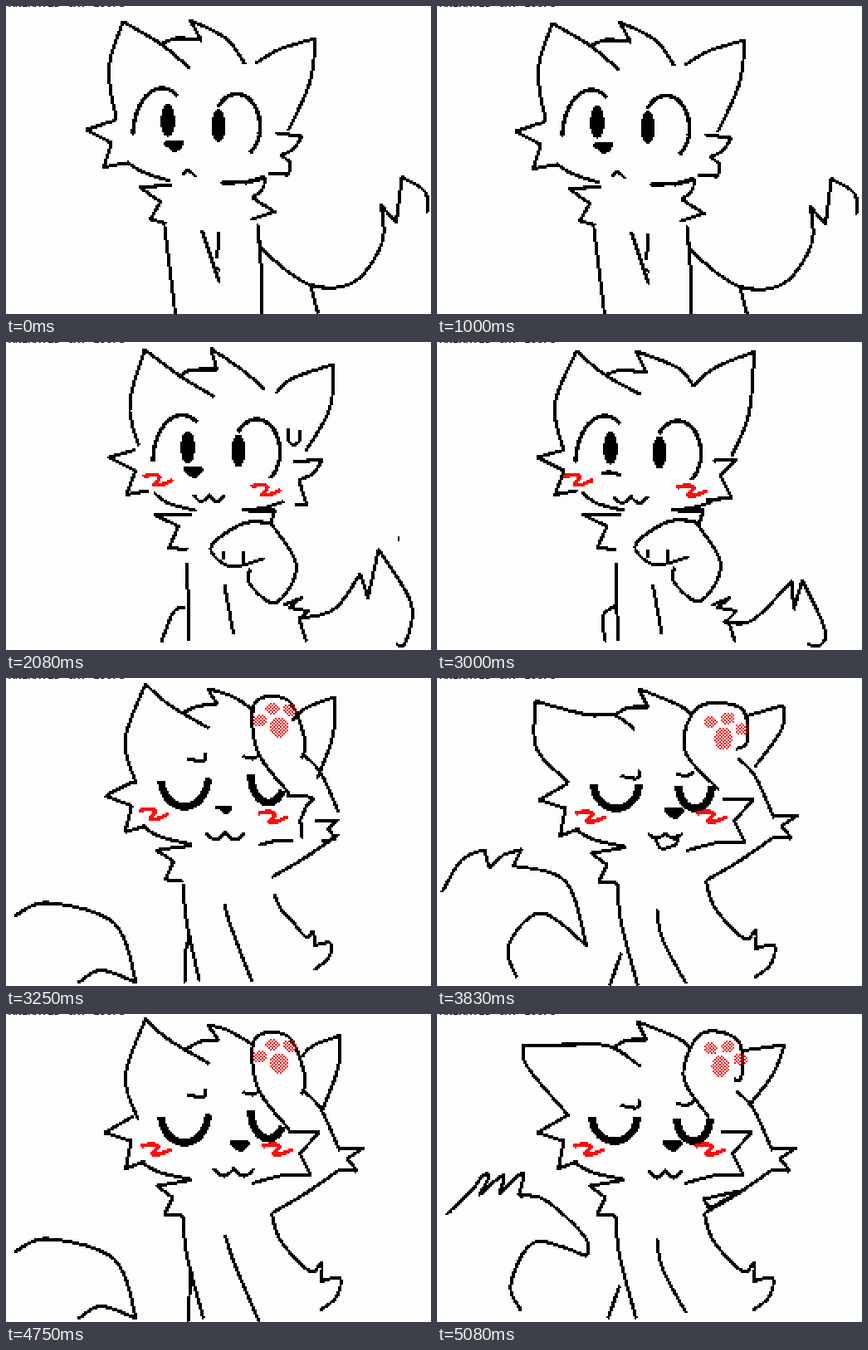
An HTML page with a canvas for the animation above (5.25 s loop, 512 by 371 pixels).

```html
<!DOCTYPE html>
<html lang="en">
<head>
<meta charset="utf-8">
<title>Cat salute</title>
<style>
html, body { margin: 0; width: 100%; height: 100%; overflow: hidden; background: #fdfdfd; }
canvas { position: absolute; left: 0; top: 0; width: 512px; height: 372px; image-rendering: pixelated; }
p { position: absolute; left: 3px; top: -10px; margin: 0; font: bold 13px/13px "DejaVu Sans Mono", monospace; white-space: nowrap; }
</style>
</head>
<body>
<canvas width="256" height="186"></canvas>
<p>ANIMATED CAT LOOPS</p>
<script>
const ellipses = /^(pupil|pad)/;
const between = (p, q, t) => p.map((v, k) => v + (q[k] - v) * t);

// Catmull-Rom curve through "x,y" points; a slash makes the point before it a sharp corner
function smooth(text) {
  const out = [];
  for (const run of text.split('/')) {
    const pts = run.split(' ').map(p => p.split(',').map(Number));
    if (out.length) pts.unshift(out[out.length - 1]);
    else out.push(pts[0]);
    for (let i = 0; i + 1 < pts.length; i++) {
      const b = pts[i], c = pts[i + 1], a = pts[i - 1] || b, d = pts[i + 2] || c;
      for (let u = .125; u <= 1; u += .125)
        out.push([0, 1].map(k => b[k] + u / 2 * (c[k] - a[k] + u * (2 * a[k] - 5 * b[k] + 4 * c[k] - d[k] + u * (3 * (b[k] - c[k]) + d[k] - a[k])))));
    }
  }
  return out;
}

// Even spacing lets any two strokes blend point by point
function resample(pts, count = 160) {
  const along = [0];
  for (let i = 1; i < pts.length; i++)
    along.push(along[i - 1] + Math.hypot(pts[i][0] - pts[i - 1][0], pts[i][1] - pts[i - 1][1]));
  let i = 1;
  return Array.from({ length: count }, (_, n) => {
    const at = along[along.length - 1] * n / (count - 1);
    while (i < pts.length - 1 && along[i] < at) i++;
    return between(pts[i - 1], pts[i], (at - along[i - 1]) / (along[i] - along[i - 1] || 1));
  });
}

function pose(parts) {
  const out = {};
  for (const name in parts) {
    const part = parts[name];
    out[name] = ellipses.test(name) ? part : resample(typeof part === 'string' ? smooth(part) : part);
  }
  return out;
}

// The matching parts of a pose, shifted; the second pair of an ellipse is its radii
function move(parts, dx, dy, which = /./) {
  const out = {};
  for (const name in parts)
    if (which.test(name))
      out[name] = parts[name].map(([x, y], i) => ellipses.test(name) && i ? [x, y] : [x + dx, y + dy]);
  return out;
}

function mix(a, b, t) {
  const out = {};
  for (const name in { ...a, ...b }) {
    if (a[name] && b[name]) out[name] = a[name].map((p, i) => between(p, b[name][i], t));
    else if ((t < .5 ? a : b)[name]) out[name] = (t < .5 ? a : b)[name];
  }
  return out;
}

function arc(x, y, rx, ry, from, to) {
  return Array.from({ length: 40 }, (_, i) => {
    const angle = (from + (to - from) * i / 39) * Math.PI / 180;
    return [x + rx * Math.cos(angle), y + ry * Math.sin(angle)];
  });
}

const at = (x, y, shape) => smooth(shape).map(p => [x + p[0], y + p[1]]);
const nose = (x, y) => at(x, y, '-11,-4/11,-4/6,3 0,5/-11,-4');
const blush = (x, y) => at(x, y, '-18,-4 -5,-6 2,-3 -5,6/4,6 18,0');
const mouth = (x, y, w, h) => Array.from({ length: 41 }, (_, i) => [x + w * i / 40, y + h * Math.abs(Math.sin(Math.PI * i / 20))]);

const openEyes = (lx, ly, rx, ry) => ({
  lidL: arc(lx, ly, 35, 58, 182, 302),
  lidR: arc(rx, ry, 28, 39, 217, 415),
  pupilL: [[lx + 7, ly - 19], [8.5, 20]],
  pupilR: [[rx - 22, ry - 1], [8.5, 20]]
});

function pads(x, y, turn) {
  const out = { pad: [[x, y], [11, 13]] };
  for (let i = 0; i < 3; i++) {
    const [toe] = arc(x, y, 25, 25, turn + 50 * i, 0);
    out['pad' + i] = [toe, [8, 7]];
  }
  return out;
}

const calm = pose({
  earL: '221,75 187,46 141,19/124,75 133,137',
  hair: '187,46 205,39 235,41/222,17/265,39 288,70',
  earR: '301,69 330,52 373,39/366,92 340,150',
  cheekL: '133,137 97,149/127,165/118,194/146,189',
  jawL: '146,188 165,200 198,211',
  cheekR: '325,153 357,157/346,172 331,180/342,189 340,203/316,202',
  jawR: '259,213 287,212 312,205',
  ruffL: '199,216 161,218/186,236/174,257/193,262',
  ruffR: '287,214 312,207/309,220 297,231/324,248/295,257',
  sideL: '191,265 204,371',
  belly: '236,270 257,333',
  crease: '257,272 254,304',
  fleck: '253,315 258,318',
  sideR: '303,263 308,325 308,371',
  tail: '303,278 314,298 367,336 420,332 453,285 452,240/470,261/477,206/505,224 507,249',
  hip: '367,336 376,371',
  ...openEyes(188, 157, 278, 145),
  nose: nose(202, 169),
  mouth: '212,204 219,198 229,206'
});

const shy = pose({
  earL: '251,66 210,41 167,9/149,75 160,125',
  hair: '208,42 222,34 254,33/247,8/285,34 312,57',
  earR: '325,62 345,44 394,27/390,80 361,131',
  cheekL: '156,130 124,139/156,155/145,184/172,179',
  jawL: '178,181 195,194 229,203',
  cheekR: '346,144 381,142/370,158 353,166/362,196/348,196',
  jawR: '285,202 310,200 335,192',
  ruffL: '224,208 179,208/208,222/196,248/219,250',
  ruffR: '292,203 324,203/318,221',
  sideL: '218,266 221,360',
  belly: '263,292 274,352',
  sideR: '334,317 356,308/341,320/364,324/352,336',
  tail: '352,333 395,322 427,279/436,308/449,250/488,315 481,362 470,364',
  hip: '354,336 362,361',
  arm: '319,218 350,270 325,314 294,292 294,273',
  paw: '319,218 285,219 247,247 270,270 311,261',
  toe1: '262,252 263,262',
  toe2: '285,252 287,268',
  leg: '216,320 202,325 187,362',
  sweat: '340,105 340,118 347,124 354,118 354,106',
  fleck: '472,237 474,237',
  ...openEyes(212, 146, 302, 132),
  nose: nose(225, 157),
  mouth: mouth(226, 184, 37, 8),
  blushL: blush(183, 166),
  blushR: blush(313, 178)
});

const blink = { ...shy, ...pose({
  lidL: arc(203, 145, 26, 10, 180, 0),
  lidR: arc(301, 147, 27, 10, 180, 0),
  pupilL: [[212, 152], [9, 1]],
  pupilR: [[292, 156], [9, 1]]
}) };

const ready = {
  ...move(shy, -3, 0, /cheekL|jaw|ruff|side|belly|hip/),
  ...move(shy, -8, -2, /arm|paw|toe/),
  ...pose({
    earL: '245,63 203,40 168,11/142,75 152,129',
    hair: '203,40 222,34 252,37/240,11/290,31 309,53',
    earR: '309,53 335,31 382,12/376,85 355,138',
    cheekR: '333,143 361,142/341,160/355,188/325,190',
    tail: '345,337 380,335 427,288/430,322/440,287/467,345 462,365 446,364',
    leg: '216,317 200,330 203,361',
    ...openEyes(202, 147, 290, 134),
    nose: '198,158 210,157 222,161',
    mouth: mouth(213, 186, 41, 8),
    blushL: blush(170, 166),
    blushR: blush(307, 179)
  })
};

const smile = pose({
  earL: '238,62 214,45 180,44 119,28/120,85 159,126',
  hair: '214,45 230,36 254,35/243,13/292,33 306,45',
  earR: '372,46 417,33/415,62 383,107',
  cheekL: '158,127 123,147/155,157/148,190/172,182',
  jawL: '165,182 190,195 226,203',
  cheekR: '344,146 381,147/358,172/371,198',
  jawR: '371,198 340,198 300,208',
  ruffL: '228,204 186,211/205,225/195,245/216,247',
  ruffR: '404,167 435,165/415,178/427,193/405,192',
  sideL: '217,247 222,295 242,371',
  belly: '265,279 272,315 300,368',
  sideR: '324,244 335,277 370,314 384,304 384,326/406,322 402,345 382,361',
  tailLeft: '6,258 30,219 57,207/63,229/80,213/102,206/92,226/155,245 180,322/125,283 86,322 96,361',
  leg: '222,331 208,371',
  upperArm: '363,97 383,118 405,166',
  foreArm: '405,192 365,220 324,244',
  palm: '340,135 298,86 315,35 366,36 374,75 360,86',
  shutL: arc(216, 128, 27, 29, 180, 0),
  shutR: arc(311, 130, 20, 27, 180, 0),
  browL: '221,118 241,121 244,111',
  browR: '288,115 300,118 310,113',
  ...pads(345, 73, -127),
  nose: nose(285, 163),
  mouth: mouth(254, 187, 42, 6),
  chin: '262,191 270,205 288,200 289,188',
  blushL: blush(185, 167),
  blushR: blush(331, 167)
});

const salute = /cheek|jaw|ruff|side|Arm|nose|blush/;

const earsUp = {
  ...move(smile, -4, -4, salute),
  ...move(smile, -3, -21, /brow/),
  ...pose({
    earL: '245,60 195,30 168,6/144,75 159,127',
    hair: '214,44 235,33 256,31/243,13/268,20 297,37',
    earR: '356,52 370,38 402,26/400,65 381,116',
    belly: '264,266 275,300 305,371',
    tailLeft: '10,287 50,271 130,295 157,367/115,352 87,367',
    leg: '223,307 219,371',
    palm: '341,139 303,88 300,30 340,27 360,75 356,97',
    shutL: arc(215, 121, 28, 34, 175, 0),
    shutR: arc(316, 116, 21, 34, 180, 35),
    ...pads(329, 60, -159),
    mouth: mouth(250, 186, 49, 9)
  })
};

const earsDown = {
  ...move(smile, -2, -4, /cheek|jaw|ruff|side|Arm|nose|blush|hair|leg|shut/),
  ...move(smile, 0, -8, /belly|brow/),
  ...pose({
    earL: '245,63 208,39 160,37 103,39/110,65 159,123',
    earR: '369,44 419,37/405,72 377,109',
    tailLeft: '11,242 42,212 56,194 63,196 51,218/80,194 75,217/104,191 98,219/130,224 178,268 181,292/118,275 89,325 101,357',
    fold: '364,213 321,223/328,234/362,216',
    palm: '328,125 297,75 318,24 362,31 367,75 358,79',
    ...pads(342, 63, -120),
    mouth: mouth(255, 188, 40, 9)
  })
};

// start time, pose, vertical shift
const steps = [
  [0, calm], [1000, move(calm, -2, 2)], [1080, move(calm, -4, 4)], [1160, mix(calm, shy, .6)], [1250, move(shy, 0, -4)], [1330, shy],
  [1830, mix(shy, blink, .5)], [1910, blink], [2000, mix(shy, blink, .5)], [2080, shy],
  [3000, ready], [3080, move(ready, -2, 4)], [3160, mix(ready, earsUp, .35)], [3250, mix(ready, earsUp, .75)],
  [3330, move(earsUp, 0, -4)], [3410, mix(earsUp, earsDown, .5)], [3500, earsDown],
  ...wave(3580), [3910, earsDown], [4000, mix(earsDown, smile, .2)], [4080, earsDown],
  ...wave(4750), [5080, earsDown]
];

function wave(t) {
  return [[t, earsUp], [t + 80, move(earsUp, 0, -6)], [t + 170, mix(earsUp, smile, .5)], [t + 250, smile]];
}

const canvas = document.querySelector('canvas');
const ctx = canvas.getContext('2d', { willReadFrequently: true });
const red = '#fc0d0d';
const tile = document.createElement('canvas');
tile.width = tile.height = 2;
const tileCtx = tile.getContext('2d');
tileCtx.fillStyle = red;
tileCtx.fillRect(0, 0, 1, 1);
tileCtx.fillRect(1, 1, 1, 1);
const checker = ctx.createPattern(tile, 'repeat');
checker.setTransform(new DOMMatrix().scale(2));

function drawPart(name, pts) {
  ctx.beginPath();
  ctx.fillStyle = name.startsWith('pad') ? checker : '#000';
  if (ellipses.test(name)) {
    ctx.ellipse(...pts[0], ...pts[1], 0, 0, 7);
    ctx.fill();
    return;
  }
  pts.forEach(p => ctx.lineTo(...p));
  ctx.strokeStyle = name.startsWith('blush') ? red : '#000';
  ctx.lineWidth = name.startsWith('shut') ? 9 : /^(lid|blush)/.test(name) ? 4.6 : 3.8;
  ctx.stroke();
  if (name === 'nose') ctx.fill();
}

function draw(parts) {
  ctx.setTransform(1, 0, 0, 1, 0, 0);
  ctx.clearRect(0, 0, 256, 186);
  ctx.scale(.5, .5);
  ctx.lineJoin = 'round';
  for (const name in parts) drawPart(name, parts[name]);

  // Hard pixel edges
  const img = ctx.getImageData(0, 0, 256, 186);
  for (let i = 3; i < img.data.length; i += 4) img.data[i] = img.data[i] > 115 ? 255 : 0;
  ctx.putImageData(img, 0, 0);
}

let shown;
const start = performance.now();
function tick() {
  const time = (performance.now() - start) % 5250;
  const step = steps.filter(s => s[0] <= time).pop();
  if (step !== shown) draw((shown = step)[1]);
  requestAnimationFrame(tick);
}
tick();
</script>
</body>
</html>
```
